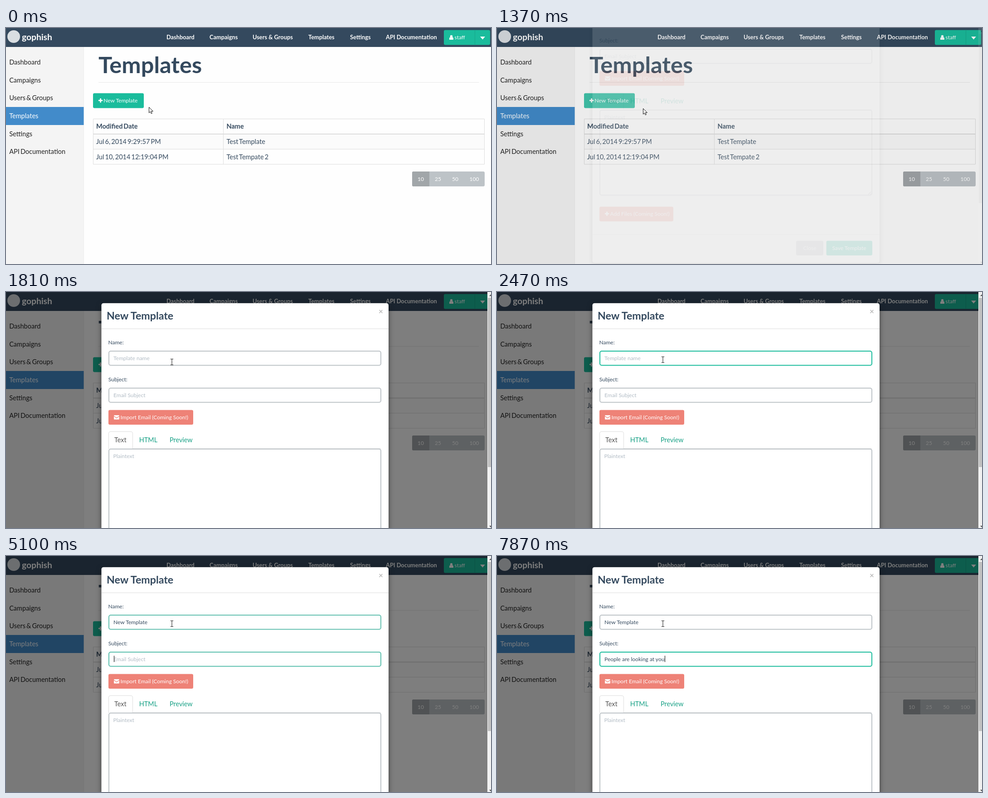
These frames come from a looping animation (1070 px wide and 523 px high, 8 s). An HTML page:

```html
<!DOCTYPE html>
<html lang="en">
<head>
<meta charset="utf-8">
<title>Templates</title>
<style>
html, body { margin: 0; width: 100%; height: 100%; overflow: hidden; background: #fefefe; }
svg { display: block; width: 1070px; height: 523px; }
text { font: 12px Lato, sans-serif; fill: #34495e; white-space: pre; }
.body text { font-size: 14.5px; word-spacing: -1.6px; }
.side text { fill: #222; }
.nav text { font-size: 12.8px; font-weight: 700; }
.side .on, .nav text, text.w { fill: #fff; }
.body .b { font-weight: 700; }
.body .h1 { font-size: 50.6px; font-weight: 700; }
.nav .brand { font-size: 19.2px; }
.title { font-size: 23.2px; font-weight: 700; }
.close { font-size: 17px; font-weight: 700; fill: #bbb; }
.tabs text { font-size: 14.4px; fill: #16a085; }
.tabs .on { fill: #555; }
.hint { fill: #b2bcc5; }
.mid { text-anchor: middle; }
.teal { fill: #1abc9c; }
.line { fill: none; stroke: #ddd; }
.box { fill: #fff; stroke: #bdc3c7; stroke-width: 2; }
.panel { fill: #fff; filter: drop-shadow(0 4px 6px rgba(0,0,0,.5)); }

.anim { animation: 8s step-end infinite; }
#new { animation-name: hover; }
#shade { animation-name: shade; }
#modal { animation-name: appear; }
#slide { animation-name: slide; }
#tabHover { animation-name: tabHover; }
#nameBox { animation-name: nameBox; }
#subjectBox { animation-name: subjectBox; }
#pointer { animation-name: move; }
#arrow { animation-name: arrow; }
#hand { animation-name: hand; }
#beam { animation-name: beam; }

@keyframes hover {
  0% { fill: #1abc9c; } 6.5% { fill: #28c0a2; } 8.125% { fill: #38c5a9; }
  9.75% { fill: #48c9b0; } 17.125% { fill: #40c5ab; } 18.75%, 100% { fill: #1abc9c; }
}
@keyframes shade { 0% { opacity: 0; } 17.125% { opacity: .07; } 18.75%, 100% { opacity: .5; } }
@keyframes appear { 0% { opacity: 0; } 17.125% { opacity: .13; } 18.75%, 100% { opacity: 1; } }
@keyframes slide {
  0% { transform: translateY(-166px); } 18.75% { transform: translateY(-18px); }
  20.75%, 100% { transform: none; }
}
@keyframes tabHover { 0% { opacity: 0; } 18.75% { opacity: 1; } 20.75%, 100% { opacity: 0; } }
@keyframes nameBox {
  0% { stroke: #bdc3c7; } 24% { stroke: #9cc2be; } 25.625% { stroke: #5bbfad; }
  27.375% { stroke: #1abc9c; } 62.125% { stroke: #2bbda1; } 63.75% { stroke: #64c0b0; }
  65.5%, 100% { stroke: #bdc3c7; }
}
@keyframes subjectBox {
  0% { stroke: #bdc3c7; } 62.125% { stroke: #a8c2c0; } 63.75% { stroke: #5bbfad; }
  65.5%, 100% { stroke: #1abc9c; }
}
@keyframes move {
  0% { transform: translate(315px, 175px); }
  3.25% { transform: translate(313px, 174px); }
  4.875% { transform: translate(308px, 172px); }
  6.5% { transform: translate(302px, 170px); }
  8.125% { transform: translate(298px, 168px); }
  9.75% { transform: translate(296px, 167px); }
  11.875% { transform: translate(295px, 166px); }
  17.125% { transform: translate(322px, 178px); }
  18.75% { transform: translate(362px, 174px); }
  20.75% { transform: translate(366px, 167px); }
  22.375% { transform: translate(366px, 155px); }
  24%, 100% { transform: translate(366px, 150px); }
}
@keyframes arrow { 0% { opacity: 1; } 6.5% { opacity: 0; } 17.125% { opacity: 1; } 22.375%, 100% { opacity: 0; } }
@keyframes hand { 0% { opacity: 0; } 6.5% { opacity: 1; } 17.125%, 100% { opacity: 0; } }
@keyframes beam { 0% { opacity: 0; } 22.375%, 100% { opacity: 1; } }
</style>
</head>
<body>
<svg viewBox="0 0 1070 523">
  <defs>
    <path id="plus" d="M3.2 0h2.8v3.2h3.2v2.8H6v3.2H3.2V6H0V3.2h3.2z" fill="#fff"/>
  </defs>

  <!-- page -->
  <rect width="1070" height="523" fill="#fefefe"/>
  <g class="body side">
    <rect y="42" width="172" height="481" fill="#f4f4f4"/>
    <path d="M171.5 42v481" stroke="#eee"/>
    <rect y="175" width="171.5" height="40" fill="#428bca"/>
    <text x="7.2" y="81">Dashboard</text>
    <text x="7.2" y="121">Campaigns</text>
    <text x="7.2" y="160">Users &amp; Groups</text>
    <text x="7.2" y="200" class="on">Templates</text>
    <text x="7.2" y="240">Settings</text>
    <text x="7.2" y="279">API Documentation</text>
  </g>

  <g class="nav">
    <rect width="1070" height="42" fill="#34495e"/>
    <circle cx="17" cy="19" r="14" fill="#d9dee2"/>
    <text x="35" y="27" class="brand">gophish</text>
    <text x="354" y="25">Dashboard</text>
    <text x="449" y="25">Campaigns</text>
    <text x="544" y="25">Users &amp; Groups</text>
    <text x="667" y="25">Templates</text>
    <text x="759" y="25">Settings</text>
    <text x="838" y="25">API Documentation</text>
  </g>
  <rect x="966" y="4.500" width="102" height="33" rx="3.2" class="teal"/>
  <path d="M1034.500 4.500v33" stroke="#17a689"/>
  <path d="M1046 19h11l-5.500 6.500z" fill="#fff"/>
  <g fill="#fff">
    <circle cx="982.500" cy="18.500" r="2.700"/>
    <path d="M978 26v-2.500q0-3 2.500-3.200 2 1.800 4 0 2.500.2 2.500 3.200V26z"/>
  </g>
  <text x="989.5" y="25" class="w">staff</text>

  <g class="body">
    <text x="204" y="100" class="h1">Templates</text>
    <path d="M204 120.500h839.500" stroke="#e8e8e8"/>
    <rect x="192.500" y="235" width="863" height="33" fill="#fbfbfb"/>
    <path class="line" d="M192.500 201.500h863v100.500h-863zM479.500 201.500v100.500M192.500 268.500h863"/>
    <path class="line" stroke-width="2" d="M192.500 235h863"/>
    <text x="199" y="223" class="b">Modified Date</text>
    <text x="486.500" y="223" class="b">Name</text>
    <text x="199" y="257">Jul 6, 2014 9:29:57 PM</text>
    <text x="486.500" y="257">Test Template</text>
    <text x="199" y="290.500">Jul 10, 2014 12:19:04 PM</text>
    <text x="486.500" y="290.500">Test Tempate 2</text>
  </g>
  <rect id="new" class="anim" x="192" y="144.500" width="112" height="33" rx="3.2" fill="#1abc9c"/>
  <use href="#plus" x="204" y="156"/>
  <text x="215.300" y="165" class="w">New Template</text>

  <rect x="896" y="318" width="160" height="33" rx="3.2" fill="#bdc3c7"/>
  <path d="M934 318h-35q-3 0-3 3v27q0 3 3 3h35z" fill="#a1a6a9"/>
  <g class="mid">
    <text x="915" y="339" class="w">10</text>
    <text x="953" y="339" class="w">25</text>
    <text x="991" y="339" class="w">50</text>
    <text x="1033" y="339" class="w">100</text>
  </g>

  <!-- dialog -->
  <rect id="shade" class="anim" width="1070" height="523" opacity="0"/>
  <g id="modal" class="anim" opacity="0">
    <rect x="1062" width="8" height="523" fill="#f1f1f1"/>
    <rect x="1063" y="13" width="7" height="375" fill="#c1c1c1"/>
    <path d="M1066 9l4-4v4zM1066 518h4v4z" fill="#505050"/>
    <g id="slide" class="anim">
      <rect x="210.500" y="24.700" width="633.500" height="662" rx="4.8" class="panel"/>
      <text x="222" y="61" class="title">New Template</text>
      <text x="827" y="49" class="close mid">×</text>
      <path class="line" d="M211 81.500h633M211 623.500h633" stroke="#e5e5e5"/>

      <text x="225.500" y="116">Name:</text>
      <rect id="nameBox" class="box anim" x="227" y="131" width="600" height="31.500" rx="4"/>
      <text id="nameHint" x="237" y="151" class="hint">Template name</text>
      <text id="name" x="237" y="151"></text>

      <text x="225.800" y="198">Subject:</text>
      <rect id="subjectBox" class="box anim" x="227" y="213" width="600" height="31.500" rx="4"/>
      <text id="subjectHint" x="237" y="233" class="hint">Email Subject</text>
      <text id="subject" x="237" y="233"></text>
      <rect id="caret" width="1" height="14"/>

      <rect x="226" y="261.500" width="187" height="32.500" rx="3.2" fill="#ee8277"/>
      <rect x="238" y="273" width="12" height="9.500" rx="1.300" fill="#fff"/>
      <path d="M238 275l6 4.300 6-4.300" fill="none" stroke="#ee8277" stroke-width="1.200"/>
      <text x="252.500" y="282" class="w">Import Email (Coming Soon!)</text>

      <g class="tabs">
        <path class="line" d="M226 347h601"/>
        <path id="tabHover" class="anim" d="M281.500 346.500v-34q0-3 3-3h59.500q3 0 3 3v34" fill="#fff" stroke="#f0f0f0"/>
        <path d="M226.500 348v-35q0-3.500 3.500-3.500h46q3.500 0 3.500 3.500v35" fill="#fff" stroke="#ddd"/>
        <text x="239" y="333" class="on">Text</text>
        <text x="293.800" y="333">HTML</text>
        <text x="361" y="333">Preview</text>
      </g>
      <rect class="box" x="227" y="348" width="600" height="188.500" rx="4"/>
      <text x="236.500" y="368" class="hint">Plaintext</text>
      <path d="M819 535l6-6M823 535l2-2" stroke="#888"/>

      <rect x="226" y="562" width="163" height="32.500" rx="3.2" fill="#ee8277"/>
      <use href="#plus" x="238" y="573"/>
      <text x="249.500" y="582" class="w">Add Files (Coming Soon!)</text>
      <rect x="660" y="637.500" width="60" height="32.500" rx="3.2" fill="#bdc3c7"/>
      <text x="690" y="658" class="w mid">Close</text>
      <rect x="726.500" y="637.500" width="101.500" height="32.500" rx="3.2" class="teal"/>
      <text x="777" y="658" class="w mid">Save Template</text>
    </g>
  </g>

  <!-- pointer -->
  <g id="pointer" class="anim" fill="#fff" stroke="#111">
    <path id="arrow" class="anim" d="M.5.5v12.500l2.900-2.700 2 4.500 2-.9-2-4.400h4z"/>
    <g id="hand" class="anim">
      <path transform="translate(-6 -1)" d="M4.500 11.500V2a1.300 1.300 0 0 1 2.600 0v5c.3-1 2.300-.8 2.400.4.4-.9 2.200-.6 2.300.5.6-.7 1.900-.2 1.900 1v4.500c0 1.200-1 2.400-1.200 3.400v1.700H5.300V17C4.600 15.500 2.500 13 1 10.800.3 9.600 1.800 8.700 2.800 9.700z"/>
    </g>
    <path id="beam" class="anim" fill="none" d="M-3-6.500h2.200q.8 0 .8.8v11.400q0 .8-.8.8H-3M3-6.500H.8q-.8 0-.8.8M3 6.500H.8q-.8 0-.8-.8"/>
  </g>
</svg>
<script>
const LOOP = 8000, FOCUS = 1920, TAB = 4970;
const SUBJECT = 'People are looking at you';

// Time of each keystroke burst with the field's text after it.
const nameKeys = [
  [0, ''], [2730, 'N'], [2860, 'Ne'], [2990, 'New'], [3120, 'New '], [3350, 'New T'],
  [3490, 'New Tme'], [3610, 'New Tmep'], [3910, 'New Tme'], [4040, 'New T'],
  [4200, 'New Te'], [4330, 'New Tem'], [4460, 'New Temp'], [4700, 'New Templa'],
  [4850, 'New Template']
];
// Same for the subject, as the number of letters typed.
const subjectKeys = [
  [0, 0], [5240, 1], [5510, 2], [5950, 3], [6080, 5], [6220, 6], [6350, 8], [6500, 10],
  [6650, 12], [6800, 13], [6960, 15], [7220, 17], [7350, 18], [7500, 21], [7700, 23], [7870, 25]
];

const $ = id => document.getElementById(id);
const valueAt = (keys, t) => keys.filter(([time]) => time <= t).pop()[1];

function fill(id, value) {
  $(id).textContent = value;
  $(id + 'Hint').style.display = value ? 'none' : '';
}

function draw(t) {
  fill('name', valueAt(nameKeys, t));
  fill('subject', SUBJECT.slice(0, valueAt(subjectKeys, t)));
  const inSubject = t >= TAB;
  const field = $(inSubject ? 'subject' : 'name');
  const width = field.textContent ? field.getComputedTextLength() : 0;
  const shown = t >= FOCUS && !(t >= 2470 && t < 2730);
  const caret = $('caret');
  caret.setAttribute('x', Math.round(237.5 + width));
  caret.setAttribute('y', inSubject ? 221 : 140);
  caret.style.display = shown ? '' : 'none';
}

let start;
function tick(now) {
  start ??= now;
  draw((now - start) % LOOP);
  requestAnimationFrame(tick);
}
requestAnimationFrame(tick);
</script>
</body>
</html>
```
